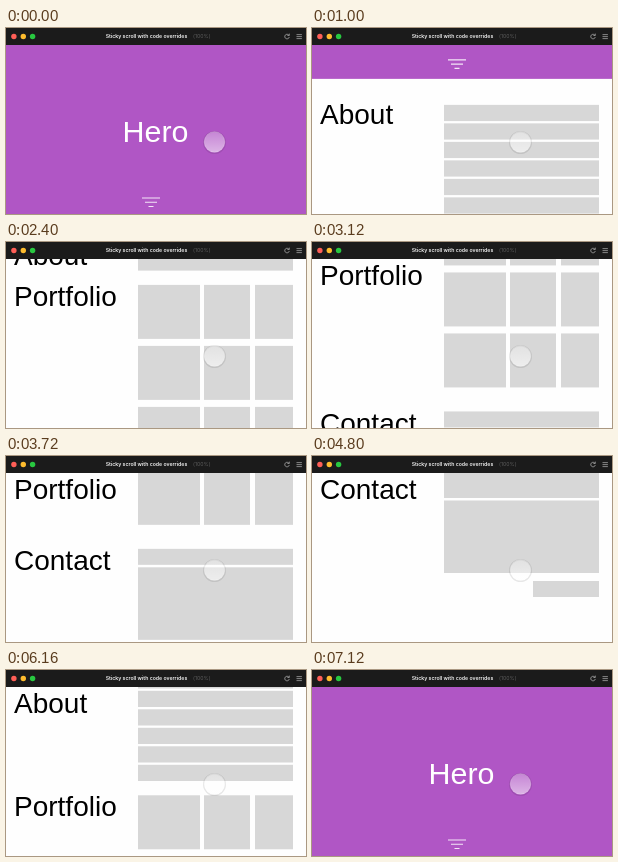
Write an HTML page that moves like this. It is 300 px wide and 186 px high and loops after 7.16 s.

```html
<!DOCTYPE html>
<html lang="en">
<head>
<meta charset="utf-8">
<title>Sticky scroll</title>
<style>
  html, body { margin: 0; width: 100%; height: 100%; overflow: hidden; background: #fefefe; }
  svg { display: block; width: 300px; height: 186px; }
  text { white-space: pre; }
  .heading { font: 28px "Liberation Sans", Arial, sans-serif; fill: #000; }
  .hero { font: 30.4px "Liberation Sans", Arial, sans-serif; fill: #fff; text-anchor: middle; }
  .bar { font: 600 5.2px Inter, sans-serif; fill: #f4f4f4; }
  .bar .dim { fill: #5c5c5c; font-weight: 400; }
  .line { fill: none; stroke: #fff; stroke-opacity: .85; stroke-width: 1.1; }
  .icon { fill: none; stroke: #b4b4b4; stroke-width: .7; }
</style>
</head>
<body>
<svg viewBox="0 0 300 186">
  <defs>
    <linearGradient id="glass" x1="0" y1="0" x2="0" y2="1">
      <stop offset="0" stop-color="#fff" stop-opacity=".28"/>
      <stop offset="1" stop-color="#fff" stop-opacity=".56"/>
    </linearGradient>
  </defs>

  <rect width="300" height="186" fill="#fefefe"/>
  <g id="page">
    <rect y="16" width="300" height="173" fill="#b056c5"/>
    <text class="hero" x="149.5" y="114">Hero</text>
    <path class="line" d="M136 170h18M139 174.3h12M142.5 178.5h5"/>
    <g id="blocks" fill="#d7d7d7"></g>
  </g>
  <g id="headings" class="heading"></g>

  <g id="cursor">
    <circle cx="208.5" cy="114.5" r="10.8" fill="none" stroke="#000" stroke-opacity=".09" stroke-width="1.4"/>
    <circle cx="208.5" cy="114" r="10.3" fill="url(#glass)" stroke="#fff" stroke-opacity=".4" stroke-width=".6"/>
  </g>

  <rect width="300" height="17" fill="#1b1b1b"/>
  <circle cx="7.9" cy="8.5" r="2.7" fill="#ff5f57"/>
  <circle cx="17.3" cy="8.5" r="2.7" fill="#febc2e"/>
  <circle cx="26.6" cy="8.5" r="2.7" fill="#28c840"/>
  <text class="bar" x="99.7" y="10.3">Sticky scroll with code overrides</text>
  <text class="bar" x="187" y="10.3"><tspan class="dim">(100%)</tspan></text>
  <path class="icon" d="M282.9 7.2A2.3 2.3 0 1 0 283.3 9M283.3 5.6v1.9h-1.9"/>
  <path class="icon" d="M290.5 6.6h5.4M290.5 8.6h5.4M290.5 10.6h5.4"/>
</svg>

<script>
  const LOOP = 7160, STUCK = 43, LEFT = 132, RIGHT = 287;
  const NS = "http://www.w3.org/2000/svg";
  const $ = id => document.getElementById(id);

  function add(parent, tag, attrs, text = "") {
    const el = document.createElementNS(NS, tag);
    for (const key in attrs) el.setAttribute(key, attrs[key]);
    el.textContent = text;
    return parent.appendChild(el);
  }

  function block(y, height, x = LEFT, width = RIGHT - x) {
    add($("blocks"), "rect", { x, y, width, height });
  }

  for (let i = 0; i < 6; i++) block(215 + 18.5 * i, 16.2);
  for (let i = 0; i < 3; i++) {
    const y = 338 + 61 * i;
    block(y, 54, LEFT, 62);
    block(y, 54, 198, 46);
    block(y, 54, 249);
  }
  block(538, 16);
  block(556.5, 72.5);
  block(631.5, 72.5);
  block(712, 16, 221);

  // heading baseline and section end, in page coordinates
  const sections = [
    { name: "About", base: 234, end: 323 },
    { name: "Portfolio", base: 359, end: 514 },
    { name: "Contact", base: 559.5, end: 760 }
  ];
  for (const s of sections) s.el = add($("headings"), "text", { x: 8 }, s.name);

  // time, scroll offset, speed
  const keys = [
    [90, 0, 0], [1000, 138, .13], [2400, 295, .113], [3720, 445, .16], [4440, 587, 0],
    [4940, 587, 0], [6160, 213, -.3], [7100, 0, 0], [LOOP, 0, 0]
  ];

  function scrollAt(t) {
    if (t <= keys[0][0]) return 0;
    const i = keys.findIndex(k => t < k[0]);
    const [t0, y0, v0] = keys[i - 1], [t1, y1, v1] = keys[i];
    const d = t1 - t0, u = (t - t0) / d, w = 1 - u;
    return w * w * ((1 + 2 * u) * y0 + u * d * v0) + u * u * ((3 - 2 * u) * y1 - w * d * v1);
  }

  function draw() {
    const scroll = scrollAt(performance.now() % LOOP);
    $("page").setAttribute("transform", `translate(0 ${-scroll})`);
    for (const s of sections) {
      const y = Math.min(Math.max(s.base - scroll, STUCK), s.end - 5 - scroll);
      s.el.setAttribute("y", y);
    }
    requestAnimationFrame(draw);
  }
  draw();
</script>
</body>
</html>
```
